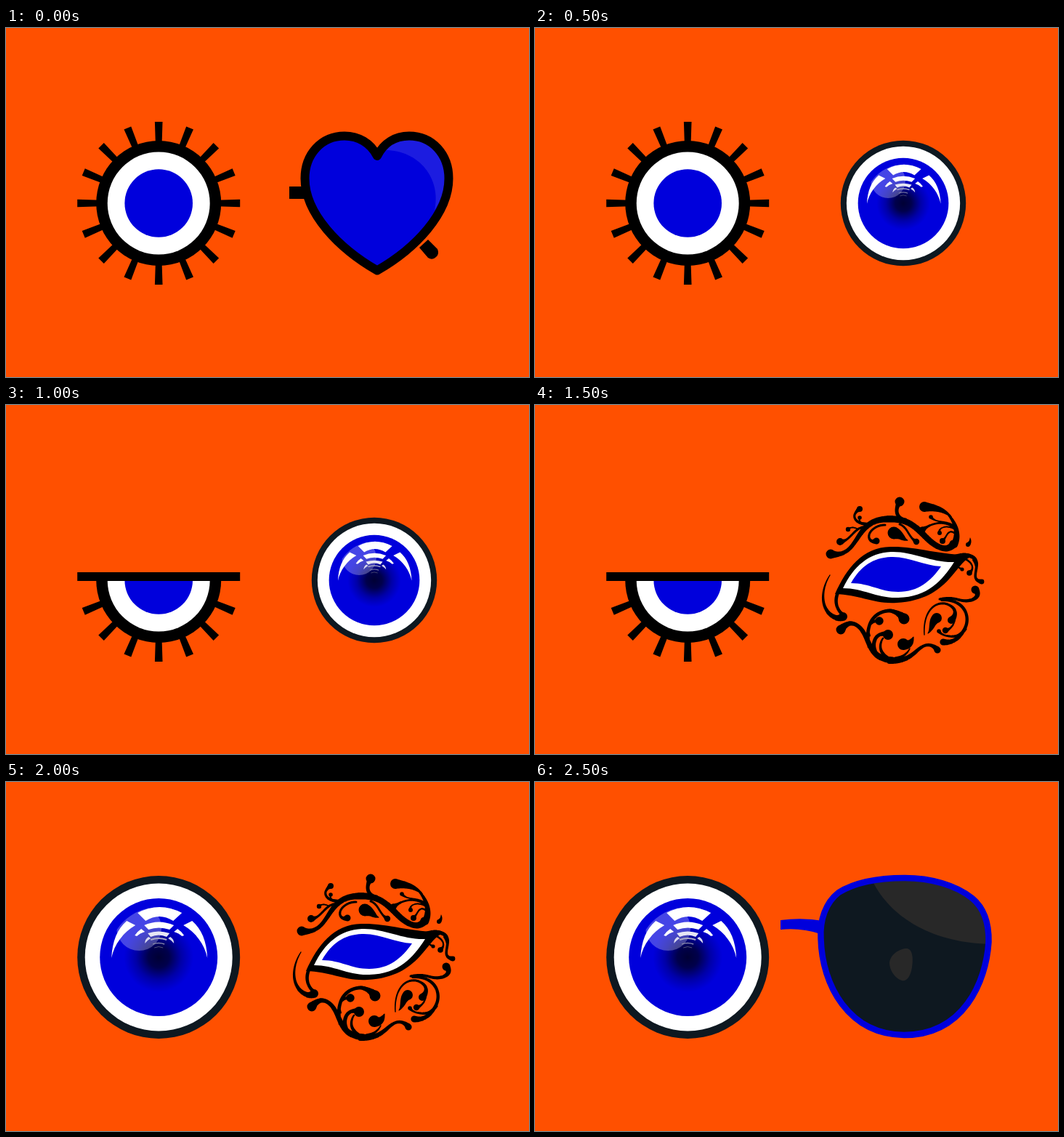
Animation, 720 px wide and 480 px high, one loop 3 s. Source, as an HTML page with a canvas:

```html
<!DOCTYPE html>
<html lang="en">
<head>
<meta charset="utf-8">
<title>Mismatched eyes</title>
<style>
html, body { margin: 0; width: 100%; height: 100%; overflow: hidden; background: #ff5000; }
canvas { display: block; }
</style>
</head>
<body>
<canvas width="720" height="480"></canvas>
<script>
const ctx = document.querySelector('canvas').getContext('2d');
const ORANGE = '#ff5000', BLUE = '#0000dc', DARK = '#0e1820', BLACK = '#000', WHITE = '#fff';

function shape(d, color) {
  ctx.fillStyle = color;
  ctx.fill(new Path2D(d));
}

function outline(d, color, width) {
  ctx.strokeStyle = color;
  ctx.lineWidth = width;
  ctx.lineJoin = 'round';
  ctx.stroke(new Path2D(d));
}

function disc(x, y, r, color) {
  ctx.fillStyle = color;
  ctx.beginPath();
  ctx.arc(x, y, r, 0, 7);
  ctx.fill();
}

function place(x, y, scale, draw) {
  ctx.save();
  ctx.translate(x, y);
  ctx.scale(scale, scale);
  draw();
  ctx.restore();
}

// Lashes start at the right and run clockwise.
function lashes(first, last) {
  for (let i = first; i <= last; i++) {
    ctx.save();
    ctx.rotate(i * Math.PI / 8);
    shape('M80 -4.3L112 -5.3V5.3L80 4.3Z', BLACK);
    ctx.restore();
  }
}

function eyeball() {
  disc(0, 0, 86, BLACK);
  disc(0, 0, 70.5, WHITE);
  disc(0, 0, 46.8, BLUE);
}

function openEye() {
  lashes(0, 15);
  eyeball();
}

function sleepyEye() {
  lashes(1, 7);
  ctx.save();
  ctx.beginPath();
  ctx.rect(-112, 0, 224, 112);
  ctx.clip();
  eyeball();
  ctx.restore();
  shape('M-112 -11H112V1H-112Z', BLACK);
}

function lens() {
  disc(0, 0, 112, DARK);
  disc(0, 0, 101.5, WHITE);
  disc(0, 0, 81, BLUE);
  const glow = ctx.createRadialGradient(0, 0, 0, 0, 0, 48);
  glow.addColorStop(0, 'rgba(0,0,20,.84)');
  glow.addColorStop(.3, 'rgba(0,0,20,.72)');
  glow.addColorStop(.65, 'rgba(0,0,30,.28)');
  glow.addColorStop(1, 'rgba(0,0,60,0)');
  disc(0, 0, 48, glow);

  // Soft reflection, cut off by the dome
  ctx.save();
  ctx.beginPath();
  ctx.arc(0, 0, 69, 0, 7);
  ctx.clip();
  disc(-27, -40, 31, 'rgba(255,255,255,.27)');
  ctx.restore();

  shape('M-29 -61Q1 -77 32 -61L20 -50Q1 -62 -18 -50Z', WHITE);
  shape('M-20 -44Q0 -53 21 -44L15 -38Q0 -43 -14 -38Z', WHITE);
  shape('M-15 -33Q0 -38 15 -33L11 -28Q0 -33 -11 -28Z', '#e6e6f4');
  for (const side of [-1, 1]) {
    ctx.save();
    ctx.translate(1, 0);
    ctx.scale(side, 1);
    shape('M66 1C65 -22 58 -39 45 -50L33 -44C50 -34 62 -18 66 1Z', WHITE);
    shape('M34 -30Q31 -35 25 -39L20 -35Q27 -33 31 -29Z', WHITE);
    shape('M20 -19Q20 -25 15 -28L12 -26Q17 -23 20 -19Z', '#d8d8f0');
    ctx.restore();
  }
  outline('M-11 -24Q0 -28 11 -24', '#a9a9c4', 2);
  outline('M-8 -18Q0 -21 8 -18', '#8585a8', 1.4);
  outline('M-6 -13Q0 -16 6 -13', '#55557c', 1);
}

function heart() {
  const body = 'M511 176C502 158 485 148.5 466 148.5C434 148.5 411.5 174 411.5 207' +
    'C411.5 255 458 303 511 333.5C564 303 609.5 255 609.5 207' +
    'C609.5 174 587 148.5 555 148.5C536 148.5 520 158 511 176Z';
  shape('M390 218H414V235H390Z', BLACK);
  shape('M569 302L581 291L594 304Q597 311 592 315Q587 320 581 316Z', BLACK);
  shape(body, BLUE);
  shape('M518 168C568 166 600 207 590 251L606 222V190L580 152H540Z', '#1c1ce0');
  outline(body, BLACK, 12);
}

// Vines are chains of dots whose radius runs from a to b, ending in a bulb.
const vines = new Path2D();
function vine(d, a, b, bulb = b) {
  const path = document.createElementNS('http://www.w3.org/2000/svg', 'path');
  path.setAttribute('d', d);
  const length = path.getTotalLength(), steps = Math.ceil(length * 1.5);
  for (let i = 0; i <= steps; i++) {
    const t = i / steps, p = path.getPointAtLength(t * length);
    const r = a + (b - a) * t + (bulb - b) * t ** 10;
    vines.moveTo(p.x + r, p.y);
    vines.arc(p.x, p.y, r, 0, 7);
  }
}

// Above the eye
vine('M488 157C455 156 449 178 437 193C429 203 420 207 407 205', 4.5, 1.6, 6.5);
vine('M488 157C524 156 532 181 552 193C562 199 571 199 576 191', 4.5, 3.5, 5.5);
vine('M577 192C586 176 576 157 566 148', 5, 1);
vine('M573 154C562 143 549 141 536 140', 1, 6.5, 7);
vine('M510 158C497 156 495 144 502 133', 2.5, 2.5, 6.5);
vine('M463 164C450 165 438 160 440 151Q442 146 447 143', 2.5, 1.2, 4);
vine('M453 164Q445 161 447 155', 1.2, 1, 2.8);
vine('M454 168C440 167 434 188 420 188', 1.8, 1.3, 5);
vine('M445 171Q436 166 431 171', 1, .9, 3.2);
vine('M482 165C466 165 456 178 461 185Q464 189 470 187', 1.5, 1.7, 4.5);
vine('M513 186C506 185 504 178 494 176', .6, 8.5);
vine('M502 164C514 169 513 181 525 188', 1.5, 1.3, 4.2);
vine('M579 169C569 157 553 164 545 154', 1.3, .8, 2.8);
vine('M579 171C565 157 546 162 533 172', 1.5, 1.2, 4.5);
vine('M578 171C569 165 555 167 557 176', 1.2, .8, 3);
vine('M580 178C568 168 568 181 561 187', 1.3, 1, 4);
vine('M599 183Q600 189 596 192', .5, 3);

// Right corner of the eye
vine('M574 211C594 202 608 208 608 219C608 231 601 241 615 243', 3.5, 1.1, 3.4);
vine('M586 210C598 212 608 223 598 231', 1.5, 1, 3.8);
vine('M584 211Q577 222 588 226', 1.3, .9, 2.6);
vine('M604 213Q610 223 606 234', 2, 1.2);

// Left and below
vine('M406 234C391 258 395 283 411 291Q418 295 424 291', .7, 3.2, 6);
vine('M417 258C411 272 417 284 425 289', 2.5, 2, 3);
vine('M492 351C459 349 462 323 448 307C438 297 429 299 421 309', 4.5, 1.8, 6.5);
vine('M488 352C522 354 525 330 542 330Q550 331 554 337', 4, 1.2, 4.6);
vine('M460 332C453 301 468 283 489 283Q501 285 508 294', 2.5, 2.2, 7.5);
vine('M460 317C456 305 463 296 474 297', 2, 1.5, 5.7);
vine('M470 343C461 328 470 310 486 316', 3, 2, 7);
vine('M488 350C474 342 473 330 479 321', 3, 1.2);
vine('M521 319C518 327 514 331 507 329', .6, 8);
vine('M496 349C508 346 513 341 516 335', 2.5, .8);
vine('M536 316C534 290 546 271 564 273C578 276 583 287 573 296', .8, 2, 5);
vine('M541 314C547 308 546 298 553 293', .6, 7);
vine('M577 281C581 297 575 308 565 310', 1.5, 1, 4.2);
vine('M560 268C591 267 601 291 591 309C584 322 573 328 562 326', 2, 2.5, 4.6);
vine('M557 267C581 262 584 273 602 268Q614 262 606 254', 1.5, 2.5, 5.5);
vine('M592 308Q585 320 570 318Q560 317 556 311', 2.5, .8, 2.8);

function ornateEye() {
  ctx.fillStyle = BLACK;
  ctx.fill(vines);
  shape('M413 260C429 224 451 196 489 195C524 194 554 206 604 207C578 214 572 268 498 272' +
    'C466 274 448 261 413 260Z', BLACK);
  shape('M424 252C438 222 460 203 490 202C520 201 546 217 577 216C561 241 541 264 500 265' +
    'C470 266 453 252 424 252Z', WHITE);
  shape('M435 245C448 222 465 210 490 209C515 208 535 221 559 222C545 242 528 257 500 257' +
    'C475 257 461 245 435 245Z', BLUE);
}

function sunglasses() {
  const rim = 'M509 132C545 132 580 142 602 160C620 175 625 197 624.5 220' +
    'C621 275 590 348 508 348C432 347 395 280 393.5 215' +
    'C392 190 400 166 418 152C442 137 475 132 509 132Z';
  shape('M338 190Q368 186 397 191L393 209Q366 200 338 203Z', BLUE);
  shape(rim, DARK);
  ctx.save();
  ctx.clip(new Path2D(rim));
  shape('M461 128C482 180 540 222 630 223V120Z', '#282828');
  ctx.restore();
  shape('M512 229C520 230 521 243 519 255C517 268 511 275 505 273' +
    'C495 270 488 258 488 249C489 237 502 229 512 229Z', '#282828');
  outline(rim, BLUE, 8.5);
}

const smallLens = () => place(507, 241, .77, lens);
const leftEyes = [openEye, sleepyEye, lens];
const rightEyes = [heart, smallLens, smallLens, ornateEye, ornateEye, sunglasses];

function frame(now) {
  const beat = Math.floor(now % 3000 / 500);
  ctx.fillStyle = ORANGE;
  ctx.fillRect(0, 0, 720, 480);
  place(210.2, 241, 1, leftEyes[beat >> 1]);
  rightEyes[beat]();
  requestAnimationFrame(frame);
}
frame(0);
</script>
</body>
</html>
```
